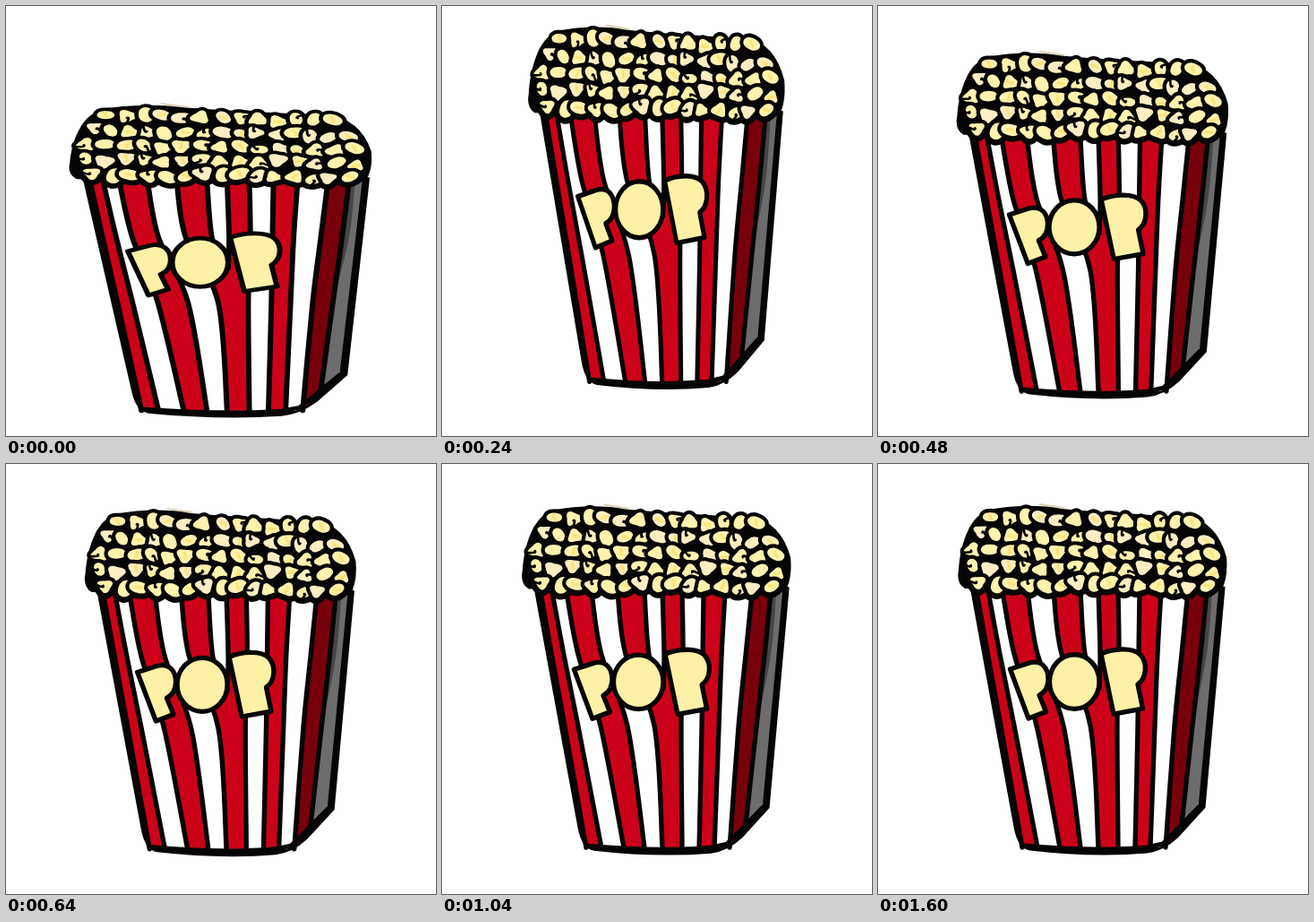
Animation, 480 px wide and 480 px high, one loop 1.92 s. Source, as an HTML page:

```html
<!DOCTYPE html>
<html lang="en">
<head>
<meta charset="utf-8">
<title>Popcorn</title>
<style>
html, body { margin: 0; width: 100%; height: 100%; overflow: hidden; background: #fff; }
svg { display: block; width: 100vw; height: 100vh; }
</style>
</head>
<body>
<svg viewBox="0 0 480 480"><g id="box" stroke-linejoin="round" stroke-linecap="round"></g></svg>
<script>
const box = document.getElementById('box');
const INK = '#050505', RED = '#cb0219', DARK = '#78000c', GREY = '#6c6c6c', CREAM = '#fdf1a7';

function add(d, fill, stroke = 'none', width = 0) {
  const p = document.createElementNS('http://www.w3.org/2000/svg', 'path');
  const attrs = { d, fill, stroke, 'stroke-width': width };
  for (const k in attrs) p.setAttribute(k, attrs[k]);
  box.append(p);
}

// Catmull-Rom curve through the points
function smooth(pts, closed) {
  const n = pts.length;
  const at = i => closed ? pts[(i + n) % n] : pts[Math.max(0, Math.min(n - 1, i))];
  let d = 'M' + pts[0];
  for (let i = 0; i < (closed ? n : n - 1); i++) {
    const [a, b, c, e] = [at(i - 1), at(i), at(i + 1), at(i + 2)];
    const c1 = b.map((v, k) => v + (c[k] - a[k]) / 6);
    const c2 = c.map((v, k) => v - (e[k] - b[k]) / 6);
    d += `C${c1} ${c2} ${c}`;
  }
  return d + (closed ? 'Z' : '');
}

// A line down the bucket, given its x at four heights
const LEVELS = [142, 212, 292, 428];
const column = (...xs) => xs.map((x, i) => [x, LEVELS[i]]);
const between = (a, b) => smooth(a) + 'L' + smooth([...b].reverse()).slice(1) + 'Z';
const line = pts => add(smooth(pts), 'none', INK, 5.3);

function stripe(a, b, color = RED) {
  add(between(a, b), color);
  line(a);
  line(b);
}

// Bucket
const BUCKET = 'M105 142L153 405Q157 428 170 430Q240 438 300 433Q318 431 334 416L364 383L386 138Z';
add(BUCKET, INK);
const left = column(110, 122.5, 137, 161);
const corner = column(346, 339, 331, 321);
const fold = [[367, 142], [360, 212], [351, 292], [339, 402]];
add(between(left, corner), '#fff');
add(between(corner, fold), DARK);
add(between(fold, [[380, 142], [358, 380]]), GREY);
add(between(fold.slice(0, 3), [[373, 142], [367, 212], [351, 292]]), '#464646');

stripe(left, column(123, 136, 152, 178));
stripe(column(139, 152, 177, 203), column(167, 178, 207, 226));
stripe(column(196, 205, 237, 246), column(268, 269, 267, 268));
stripe([[226, 142], [231, 212], [244, 250]], [[246, 142], [248, 212], [247, 250]], '#fff');
stripe(column(292, 291, 290, 287), column(316, 312, 309, 304));
line(corner);
line(fold);
add(BUCKET, 'none', INK, 3);
add('M164 426Q240 433 300 428L318 424L358 383', 'none', INK, 5);

// Lettering
for (const d of [
  'M147.5 229L169 222C183 218 190 228 190 240C190 250 186 255 180 258L187.5 276.5L168 284Z',
  'M191.5 243A27.5 30 0 1 1 247 243A27.5 30 0 1 1 191.5 243Z',
  'M249 212C262 206 284 204 293 213C301 222 300 239 290 246L295.5 273L263 279Z'
]) add(d, CREAM, INK, 5.3);

// Popcorn heap
add('M181 45L207 49M350 58L364 65L377 82M101 73L109 61', 'none', '#dfd0b4', 2);
add('M90 118C92 92 100 62 122 51Q170 43 205 50Q262 55 345 59Q378 64 389 104Q391 128 383 141L97 139Q87 133 90 118Z', INK);

const rand = i => { const s = Math.sin(i * 91.7 + 4.3) * 4375.85; return s - Math.floor(s); };

function lump(x, y, r, seed) {
  const turn = rand(seed) * 6.28, lobes = 2 + Math.floor(rand(seed + 200) * 2);
  const pts = Array.from({ length: 14 }, (_, k) => {
    const a = k * Math.PI / 7, q = r * (1 + 0.15 * Math.cos(lobes * a + turn));
    return [x + 1.08 * q * Math.cos(a), y + 0.96 * q * Math.sin(a)];
  });
  return smooth(pts, true);
}

const kernels = [];
for (let row = 0; row < 5; row++) {
  const half = 134 - 3.4 * (row - 2.5) ** 2, n = Math.round(half / 9.3);
  for (let k = 0; k <= n; k++) {
    const id = kernels.length, across = 2 * k / n - 1;
    const x = 240 + half * across + 5 * (rand(id + 300) - 0.5);
    const y = 63.5 + 17.8 * row + (4 - row / 2) * across + 6 * (rand(id + 400) - 0.5);
    kernels.push({ x, y, r: 8.6 + 2 * rand(id + 500), id, row });
  }
}

// Scalloped rim under the lowest row
for (const { x, y, r, row, id } of kernels) if (row === 4) add(lump(x, y, r, id), INK, INK, 9);

for (const { x, y, r, id } of kernels) {
  add(lump(x, y, r, id), rand(id + 50) > 0.25 ? '#fdf2ae' : '#fbeec2', INK, 4.2);
  const a = rand(id + 90) * 6.28, c = Math.cos(a), s = Math.sin(a);
  if (id % 3 === 0) add(`M${x - 3 * c} ${y - 3 * s}L${x + 3 * c} ${y + 3 * s}`, 'none', '#fbe57c', 3.5);
  if (id % 3 === 1) add(`M${x + c * r} ${y + s * r}Q${x + s * 3} ${y - c * 3} ${x + c * 2} ${y + s * 2}`, 'none', INK, 2.6);
}

// Elastic settle: u falls from 1 (squashed) to 0 (at rest)
const LOOP = 1920, STEP = 80, LATE = [800, 960, 1040, 1360, 1600];
const settle = t => 2 ** (-10 * t / LOOP) * Math.cos(2 * Math.PI * t / (0.3 * LOOP));
const hold = ms => LATE.findLast(t => t <= ms) ?? Math.floor(ms / STEP) * STEP;

function draw(ms) {
  const u = settle(hold(ms % LOOP));
  box.setAttribute('transform',
    `translate(239.5 ${241 + 43.5 * u}) scale(${1 + 0.125 * u} ${1 - 0.105 * u}) translate(-239.5 -241)`);
}

const start = performance.now();
function tick() {
  draw(performance.now() - start);
  requestAnimationFrame(tick);
}
draw(0);
requestAnimationFrame(tick);
</script>
</body>
</html>
```
